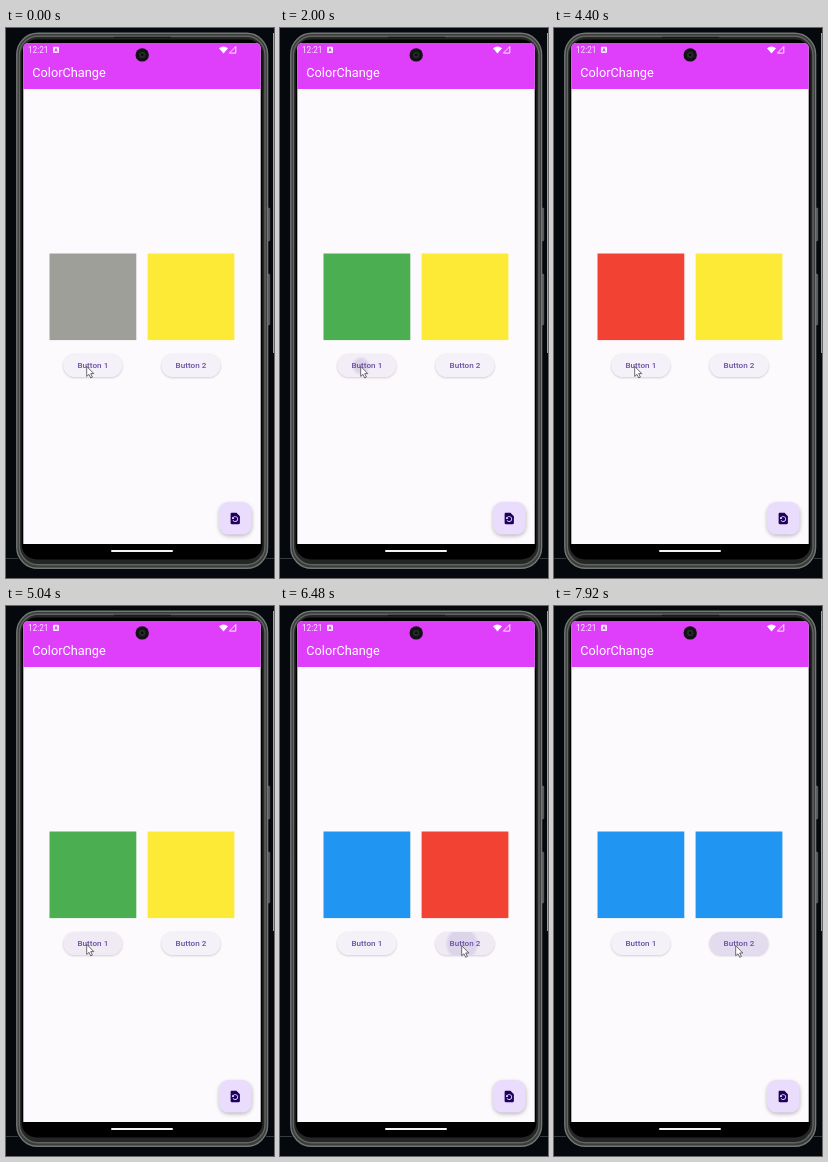
Animation of 268x550 px, one loop 8 s. Source, as an HTML page:

```html
<!DOCTYPE html>
<html lang="en">
<head>
<meta charset="utf-8">
<title>ColorChange</title>
<style>
html, body { margin: 0; width: 100%; height: 100%; overflow: hidden; background: #05080c; }
svg { display: block; width: 268px; height: 550px; }
text { font-family: Roboto, sans-serif; }
.label { font-size: 8.1px; font-weight: 500; letter-spacing: .04px; fill: #6750a4; text-anchor: middle; }
</style>
</head>
<body>
<svg viewBox="0 0 268 550">
  <defs>
    <clipPath id="screen"><rect x="17.3" y="15" width="237.4" height="515" rx="5"/></clipPath>
    <filter id="edge" x="-10%" y="-10%" width="120%" height="120%"><feGaussianBlur stdDeviation=".4"/></filter>
    <filter id="soft" x="-30%" y="-50%" width="160%" height="200%"><feGaussianBlur stdDeviation="1"/></filter>
    <filter id="wide" x="-40%" y="-40%" width="180%" height="180%"><feGaussianBlur stdDeviation="2"/></filter>
  </defs>

  <!-- desktop -->
  <rect width="268" height="550" fill="#05080c"/>
  <path d="M0 530.5H12M260 530.5H268" stroke="#353a40"/>
  <rect x="267" y="5" width="1" height="320" fill="#a0a3a6"/>

  <!-- phone body -->
  <g fill="#57595a" stroke="#717374" stroke-width=".5">
    <rect x="261" y="180" width="2.8" height="33" rx="1"/>
    <rect x="261" y="246" width="2.8" height="51" rx="1"/>
  </g>
  <g filter="url(#edge)">
    <rect x="10.8" y="5.3" width="250.8" height="535" rx="21" fill="#3a3c3b" stroke="#747674" stroke-width="1.4"/>
    <rect x="13.4" y="8.3" width="245.6" height="528.4" rx="18.5" fill="#252726" stroke="#626462" stroke-width="1.4"/>
    <rect x="15.6" y="11.5" width="240.8" height="520" rx="15" fill="#000"/>
    <path d="M108 9.5H165" stroke="#171918" stroke-width="1.6"/>
  </g>

  <g clip-path="url(#screen)">
    <rect x="17" y="15" width="238" height="501" fill="#fdfafd"/>
    <rect x="17" y="15" width="238" height="46" fill="#df3efa"/>
  </g>
  <rect x="105" y="521.9" width="62" height="2" rx="1" fill="#f4f4f4"/>

  <!-- status and title -->
  <text x="22" y="25" font-size="8.2" fill="#fbe6ff">12:21</text>
  <rect x="47" y="18.7" width="6" height="6.4" rx="1" fill="#fbe6ff"/>
  <path d="M48.8 23.6L50 20.4L51.2 23.6M49.2 22.6H50.8" fill="none" stroke="#c535df" stroke-width=".8"/>
  <path d="M213 20.2Q217.5 16.6 222 20.2L217.5 25.6Z" fill="#fff"/>
  <path d="M223.4 25.1H229.8V18.5Z" fill="none" stroke="#fff" stroke-width=".9"/>
  <g filter="url(#edge)">
    <circle cx="136.2" cy="26.9" r="6.7" fill="#111213"/>
    <circle cx="136.2" cy="26.9" r="3.2" fill="#282b2c"/>
    <circle cx="136.2" cy="26.9" r="1.4" fill="#0b0d0e"/>
  </g>
  <text x="26.3" y="49" font-size="12.74" fill="#fff">ColorChange</text>

  <g id="controls"></g>

  <!-- restore button -->
  <rect x="213.3" y="476" width="32.4" height="32" rx="9.3" fill="#000" opacity=".28" filter="url(#wide)"/>
  <rect x="213" y="474" width="32.6" height="32.6" rx="9.3" fill="#e9dcfd"/>
  <path transform="translate(222.3 483.5) scale(.58)" fill="#21005d" d="M14 2H6c-1.1 0-1.99.9-1.99 2L4 20c0 1.1.89 2 1.99 2H18c1.1 0 2-.9 2-2V8l-6-6zm-2 16c-2.05 0-3.81-1.24-4.58-3h1.71c.63.9 1.68 1.5 2.87 1.5 1.93 0 3.5-1.57 3.5-3.5S13.93 9.5 12 9.5c-1.35 0-2.52.78-3.1 1.9l1.6 1.6h-4V9l1.3 1.3C8.69 8.92 10.23 8 12 8c2.76 0 5 2.24 5 5s-2.24 5-5 5z"/>

  <path id="cursor" d="M0 0V10L2.3 8L4 11.5L5.7 10.7L4 7.2H7.1Z" fill="#fff" stroke="#4a4650" stroke-width=".8" stroke-linejoin="round"/>
</svg>
<script>
const LOOP = 8000, STEP = 80, FADE = 400;
const RED = '#f24234', GREEN = '#4bae50', BLUE = '#2195f2';

// Each tap: press time, release time, color set on release.
const controls = [
  { x: 43.5, label: 'Button 1', color: '#9e9f99', touchX: 81, taps: [
    [80, 80, RED], [480, 1520, GREEN], [2000, 2960, BLUE],
    [4000, 4000, RED], [4720, 4720, GREEN], [5120, 5600, BLUE]] },
  { x: 141.6, label: 'Button 2', color: '#fcea37', touchX: 182, taps: [
    [6400, 6480, RED], [6800, 6880, GREEN], [7280, 7920, BLUE]] }
];
const cursorPath = [[5520, 80.7, 338.4], [5600, 100.3, 341.5], [5760, 138, 341.3], [6080, 181.7, 339.8]];

const clamp = v => Math.max(0, Math.min(1, v));
const mix = (a, b, k) => a + (b - a) * k;
const cursor = document.getElementById('cursor');

document.getElementById('controls').innerHTML = controls.map((c, i) => {
  const left = c.x + 13.8;
  const pill = extra => `<rect x="${left}" y="326" width="59" height="23" rx="11.5" ${extra}/>`;
  return `<clipPath id="pill${i}">${pill('')}</clipPath>
    <rect id="square${i}" x="${c.x}" y="225.5" width="86.8" height="86.6" filter="url(#edge)"/>
    <g transform="translate(0 .8)">${pill('fill="#000" opacity=".2" filter="url(#soft)"')}</g>
    ${pill('fill="#f5f1f8"')}
    <g clip-path="url(#pill${i})" fill="#6750a4">
      ${pill(`id="tint${i}"`)}
      <circle id="ripple${i}" cx="${c.touchX}" cy="338" filter="url(#soft)"/>
    </g>
    <text class="label" x="${c.x + 43.4}" y="340.4">${c.label}</text>`;
}).join('');

controls.forEach((c, i) => {
  for (const part of ['square', 'tint', 'ripple']) c[part] = document.getElementById(part + i);
});

function drawControl(c, t) {
  const released = c.taps.filter(tap => t >= tap[1]).pop();
  c.square.setAttribute('fill', released ? released[2] : c.color);

  const tap = c.taps.filter(tap => t >= tap[0]).pop();
  let tint = 0, ripple = 0, radius = 0;
  if (tap) {
    const [press, release] = tap;
    const age = t - press;
    const fade = 1 - clamp((t - release) / FADE);
    tint = .09 * clamp(.2 + age / 240) * fade;
    ripple = mix(.16, .03, clamp(age / 480)) * fade;
    radius = 8 + 52 * clamp(age / 560);
  }
  c.tint.setAttribute('opacity', tint);
  c.ripple.setAttribute('opacity', ripple);
  c.ripple.setAttribute('r', radius);
}

function drawCursor(t) {
  let [, x, y] = cursorPath[0];
  for (let i = 1; i < cursorPath.length; i++) {
    const [t0, x0, y0] = cursorPath[i - 1], [t1, x1, y1] = cursorPath[i];
    if (t < t0) break;
    const k = clamp((t - t0) / (t1 - t0));
    x = mix(x0, x1, k);
    y = mix(y0, y1, k);
  }
  cursor.setAttribute('transform', `translate(${x} ${y})`);
}

const start = performance.now();
function draw() {
  const t = Math.floor((performance.now() - start) % LOOP / STEP) * STEP;
  controls.forEach(c => drawControl(c, t));
  drawCursor(t);
  requestAnimationFrame(draw);
}
draw();
</script>
</body>
</html>
```
